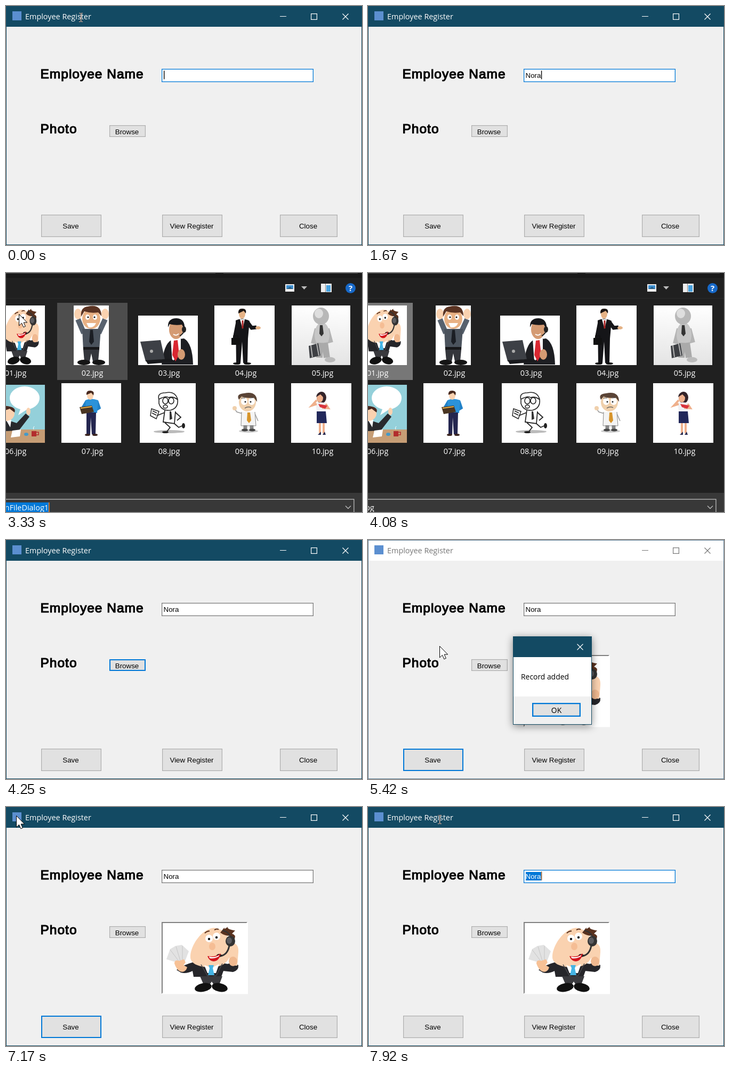
An HTML page with a canvas for the animation above (8000 ms loop, 668 px wide and 449 px high).

```html
<!DOCTYPE html>
<html lang="en">
<head>
<meta charset="utf-8">
<title>Employee Register</title>
<style>
html, body { margin: 0; width: 668px; height: 449px; overflow: hidden; }
canvas { display: block; }
</style>
</head>
<body>
<canvas id="stage" width="668" height="449"></canvas>
<script>
const g = document.getElementById('stage').getContext('2d');
const FORM = '13.33px "Liberation Sans", sans-serif';
const LABEL = '24.5px "Liberation Sans", sans-serif';
const UI = '14.4px "Open Sans", sans-serif';
const TEAL = '#134a63', BLUE = '#0078d7', SKIN = '#fad2b0', DARK = '#26262a';
const NAME = 'Nora';
const LOOP = 8000, TICKS_PER_SECOND = 12;

// --- drawing helpers ---
function rect(color, x, y, w, h) {
  g.fillStyle = color;
  g.fillRect(x, y, w, h);
}
function frame(color, x, y, w, h, lw = 1) {
  g.strokeStyle = color;
  g.lineWidth = lw;
  g.strokeRect(x + lw / 2, y + lw / 2, w - lw, h - lw);
}
function text(s, x, y, font = FORM, color = '#000', align = 'left') {
  g.font = font;
  g.fillStyle = color;
  g.textAlign = align;
  g.fillText(s, x, y);
}
function shape(color, d) {
  g.fillStyle = color;
  g.fill(new Path2D(d));
}
function line(color, lw, d) {
  g.strokeStyle = color;
  g.lineWidth = lw;
  g.stroke(new Path2D(d));
}
function oval(color, x, y, rx, ry = rx, angle = 0) {
  g.fillStyle = color;
  g.beginPath();
  g.ellipse(x, y, rx, ry, angle, 0, 7);
  g.fill();
}
function invert(x, y, w, h) {
  g.globalCompositeOperation = 'difference';
  rect('#fff', x, y, w, h);
  g.globalCompositeOperation = 'source-over';
}
function picture(x, y, w, h, draw, sx = 1, sy = 1) {
  g.save();
  g.translate(x, y);
  g.beginPath();
  g.rect(0, 0, w, h);
  g.clip();
  rect('#fff', 0, 0, w, h);
  g.scale(sx, sy);
  draw();
  g.restore();
}
function popup(progress, cx, cy, draw) {
  const s = 0.92 + 0.08 * progress;
  g.save();
  g.globalAlpha = progress;
  g.translate(cx, cy);
  g.scale(s, s);
  g.translate(-cx, -cy);
  draw();
  g.restore();
}

// --- pictures ---
function caller() {
  shape('#e2e2e2', 'M30 75L7 68L14 49L24 43L36 41L49 53L41 74Z');
  line('#c6c6c6', 1, 'M32 74L14 50M34 74L25 44M37 74L37 43');
  shape(DARK, 'M26 88Q40 78 56 74L112 74Q124 80 128 73L142 79Q143 89 132 92L114 90L110 101L58 101L56 90Q44 96 34 93Z');
  shape(SKIN, 'M122 38Q143 34 142 54L140 80L128 80Q124 66 122 38Z');
  oval('#f0b990', 132, 72, 8, 9);
  shape(SKIN, 'M52 62C53 42 72 12 96 9C118 10 131 34 127 58C123 78 106 84 86 83C66 82 51 76 52 62Z');
  shape('#f7c196', 'M22 76Q22 68 31 71L40 68L43 74L39 79L46 83Q43 94 33 91Q26 88 22 76Z');
  shape('#59321f', 'M108 18L116 8Q114 14 122 7Q120 12 136 14L130 20Q138 22 135 30L126 24Q116 24 108 18Z');
  line('#333', 2, 'M112 14Q126 16 129 32');
  oval('#333', 127, 34, 9, 10);
  oval('#5c5c60', 125, 33, 5, 6);
  line('#333', 3, 'M125 42Q122 60 108 62');
  oval('#222', 106, 61, 5, 3);
  oval('#fff', 87, 29, 7, 7);
  oval('#fff', 101, 25, 7, 7);
  oval('#111', 87, 30, 2.2);
  oval('#111', 101, 27, 2.2);
  line('#59321f', 2, 'M79 19Q83 15 88 15M97 13Q101 10 105 12');
  oval('#f5bd94', 93, 44, 6, 7);
  shape('#d3161d', 'M84 62Q98 65 109 57Q106 72 95 72Q87 71 84 62Z');
  shape('#fff', 'M87 63Q98 66 106 60L105 63Q95 68 88 66Z');
  shape('#fff', 'M78 79L92 84L106 77L100 94H84Z');
  shape('#45b4e4', 'M86 79H96L94 85L97 98H85L88 85Z');
  line('#48484c', 1.5, 'M72 78L84 99L92 102L101 98L112 76');
  shape('#3a3a3e', 'M70 100H112L106 116H96L92 110L88 116H77Z');
  oval('#111', 76, 121, 16, 8, -0.2);
  oval('#111', 107, 121, 15, 8, 0.2);
}
function cheering() {
  line('#58626e', 10, 'M19 52L8 26M47 52L59 26');
  oval(SKIN, 8, 16, 7, 10);
  oval(SKIN, 59, 16, 7, 10);
  shape('#4b535d', 'M16 44H51L48 84H18Z');
  oval('#e8b184', 33, 25, 17, 19);
  shape('#5b3423', 'M14 21Q12 4 26 2Q52 -4 52 20L46 13Q32 15 20 11Z');
  oval('#fff', 26, 22, 4, 5);
  oval('#fff', 40, 22, 4, 5);
  oval('#111', 27, 22, 1.6);
  oval('#111', 39, 22, 1.6);
  shape('#fff', 'M24 33H42Q38 43 28 41Z');
  shape('#1b1e24', 'M31 46H36L38 68L33 74L29 68Z');
  rect('#18181a', 18, 78, 30, 5);
  shape('#34363c', 'M18 83H48L46 105H36L33 90L30 105H20Z');
  oval('#151515', 19, 107, 12, 5);
  oval('#151515', 47, 107, 12, 5);
}
function operator() {
  shape('#1d1e22', 'M44 92Q48 54 62 46L86 43Q102 52 103 92Z');
  shape('#fff', 'M61 44H80L80 72L64 86Z');
  shape('#d92731', 'M67 47L74 46L77 74L70 86L64 74Z');
  oval('#d49b73', 71, 26, 13, 18);
  shape('#17181b', 'M56 22Q55 5 72 5Q89 6 87 27L82 17Q70 19 59 16Z');
  line('#222', 2, 'M86 20Q89 32 78 38');
  oval('#222', 86, 26, 4, 6);
  line('#fff', 2, 'M66 35Q72 39 76 34');
  shape('#3d4046', 'M4 49L42 46L50 82L14 86Z');
  shape('#191a1d', 'M14 84L62 81L70 87L18 91Z');
  oval('#d49b73', 81, 73, 7, 10);
  oval('#aaa', 25, 67, 3);
}
function pointing() {
  line('#151518', 7, 'M44 31L38 62M62 31L70 42L79 41');
  shape('#151518', 'M40 28Q52 22 66 29L63 62L62 108H54L52 68L49 108H41Z');
  shape('#fff', 'M48 26H57L53 44Z');
  line('#a22', 3, 'M53 28V43');
  oval('#e5b285', 52, 16, 6, 9);
  shape('#1b1512', 'M45 15Q44 5 53 6Q61 6 59 15L55 10Z');
  oval('#e5b285', 82, 42, 5, 3);
  rect('#111', 32, 61, 16, 13);
  line('#111', 1.5, 'M36 61V57H44V61');
  oval('#111', 42, 109, 7, 2);
  oval('#111', 62, 109, 7, 2);
}
function mannequin() {
  const shade = g.createLinearGradient(0, 0, 0, 112);
  shade.addColorStop(0, '#fff');
  shade.addColorStop(1, '#e4e4e4');
  rect(shade, 0, 0, 110, 112);
  line('#b4b4b4', 10, 'M48 44L41 72M66 44L73 70');
  oval('#c6c6c6', 57, 55, 14, 23);
  oval('#b8b8b8', 55, 20, 15, 16);
  oval('#dedede', 51, 15, 8, 9);
  line('#aaa', 12, 'M53 70L52 98M62 70L66 98');
  oval('#bbb', 72, 102, 10, 5);
  shape('#333', 'M53 37H58L60 53L56 58L52 53Z');
  shape('#3e4044', 'M32 76L50 71L54 94L34 99Z');
  line('#b5b5b5', 2, 'M36 75L39 97M47 72L51 94');
}
function presenter() {
  rect('#94d0da', 0, 0, 113, 110);
  oval('#fff', 75, 25, 28, 22);
  shape('#fff', 'M68 43L63 57L80 46Z');
  rect('#c69d75', 0, 84, 113, 26);
  shape('#28292d', 'M18 88Q20 66 42 66L60 72L77 54L84 60L64 86Z');
  shape('#fff', 'M40 66H50L48 80Z');
  oval(SKIN, 40, 54, 16, 14);
  shape('#47281f', 'M22 53Q22 37 42 40Q60 42 56 52L47 45L36 49Z');
  oval(SKIN, 82, 50, 4, 7);
  shape('#fff', 'M52 86L68 84L66 97L49 99Z');
  oval('#4499c8', 78, 93, 4, 3);
  rect('#b32d2d', 88, 87, 9, 10);
  line('#b32d2d', 1.5, 'M97 89H101V94H97');
  line('#fff', 1, 'M92 84Q90 81 93 78');
}
function clapper() {
  line('#2181c8', 7, 'M48 34L41 46M66 34L70 46L60 52');
  shape('#2b92d9', 'M45 32Q55 27 69 32L67 56H46Z');
  oval(SKIN, 54, 23, 6, 8);
  shape('#48291e', 'M47 22Q46 13 55 14Q63 15 60 23L56 18Z');
  shape('#24264f', 'M47 55H65L64 96H57L55 64L54 96H47Z');
  shape('#493522', 'M34 45L57 42L61 54L38 58Z');
  line('#e8b04a', 2, 'M36 47L57 44');
  oval('#3a2420', 49, 97, 5, 2);
  oval('#3a2420', 63, 97, 5, 2);
}
function runner() {
  oval('#bbb', 55, 91, 29, 3);
  oval('#fff', 51, 33, 15, 17);
  line('#222', 1.6, 'M36 31Q32 18 48 18Q66 14 71 30Q73 47 57 51Q40 52 36 38ZM36 30Q50 23 54 27Q63 24 71 31M43 33A5 6 0 1 0 53 33A5 6 0 1 0 43 33M54 33A5 6 0 1 0 64 33A5 6 0 1 0 54 33M44 44A4 3 0 1 0 52 44A4 3 0 1 0 44 44');
  line('#222', 1.8, 'M47 51L44 73L65 76L67 53M47 55L32 61M67 55L77 64L70 70M47 74L57 83L50 92M65 76L73 83L82 79');
  shape('#333', 'M56 53L59 53L61 67L56 69Z');
  line('#222', 1.5, 'M22 48L36 53L31 67L20 61ZM24 52L32 56M23 56L31 60');
  oval('#222', 48, 92, 6, 2);
  oval('#222', 82, 80, 3, 5);
}
function doctor() {
  oval('#ccc', 64, 90, 18, 3);
  line('#999', 1.5, 'M52 57L42 54L38 48M76 57L82 71');
  shape('#f4f4f4', 'M51 54H77L78 80H51Z');
  line('#888', 1, 'M51 54L50 80H78L76 54');
  line('#888', 7, 'M58 79V87M70 79V87');
  oval('#f0d0ac', 62, 36, 16, 17);
  oval('#f0d0ac', 38, 47, 4);
  shape('#5a4436', 'M46 31Q40 20 56 19Q80 14 80 35L74 27Q60 29 51 25Z');
  oval('#fff', 56, 34, 6, 7);
  oval('#fff', 70, 34, 6, 7);
  oval('#222', 58, 35, 1.5);
  oval('#222', 68, 35, 1.5);
  line('#555', 1.2, 'M50 28L58 28M67 28L75 27M57 47Q63 43 69 46');
  shape('#d7952c', 'M62 55H67L69 70L65 75L61 70Z');
  oval('#444', 57, 88, 6, 2.5);
  oval('#444', 71, 88, 6, 2.5);
}
function shopper() {
  oval('#34242a', 57, 27, 9, 11);
  oval('#efb08c', 54, 28, 6, 8);
  shape('#34242a', 'M47 26Q48 16 59 17Q65 20 62 28L55 21Z');
  shape('#f1f1f4', 'M46 38Q57 34 66 38L65 54H48Z');
  line('#efb08c', 4, 'M48 39L39 42L48 32M65 39L70 47L58 46');
  shape('#d9343c', 'M51 39L68 42L64 48L54 45Z');
  shape('#22285a', 'M48 53H65L67 75H48Z');
  line('#efb08c', 4, 'M54 75V94M61 75V94');
  shape('#2a2b50', 'M50 97L56 91V97ZM59 97L63 91L65 97Z');
}

// --- windows ---
function cross(x, y, color) {
  line(color, 1.2, `M${x} ${y}l11 11m0 -11l-11 11`);
}
function label(s, x, y) {
  g.letterSpacing = '1px';
  text(s, x, y, LABEL);
  g.strokeStyle = '#000';
  g.lineWidth = 1.2;
  g.strokeText(s, x, y);
  g.letterSpacing = '0px';
}
function button(caption, x, y, w, h, baseline, state) {
  rect(state === 'hot' ? '#e5f1fb' : '#e1e1e1', x, y, w, h);
  frame(state ? BLUE : '#adadad', x, y, w, h, state === 'focus' ? 2 : 1.2);
  text(caption, x + w / 2 - 1, baseline, FORM, '#000', 'center');
}
function field(t, focus, hover) {
  rect('#fff', 292, 118, 285, 25);
  frame(focus ? BLUE : hover ? '#171717' : '#7a7a7a', 292, 118, 285, 25, 1.3);
  const typed = t >= 20 ? 4 : [6, 9, 11].filter(k => t >= k).length;
  const value = NAME.slice(0, typed), selected = t >= 94;
  g.font = FORM;
  const width = g.measureText(value).width;
  if (selected) rect(BLUE, 296, 122, width + 1, 16);
  text(value, 295.5, 135, FORM, selected ? '#fff' : '#000');
  if (t < 2 || (t >= 6 && t < 17) || (t >= 20 && t < 31) || t >= 92)
    invert(296 + width, 121.5, 1.4, 16);
}
function mainWindow(t, hover) {
  const active = !((t >= 33 && t < 51) || (t >= 63 && t < 75));
  const ink = active ? '#fff' : '#777';
  const focus = t < 51 ? 'text' : t < 63 ? 'browse' : t < 92 ? 'save' : 'text';
  rect('#f0f0f0', 0, 0, 668, 449);
  rect(active ? TEAL : '#fff', 0, 0, 668, 39);
  frame(active ? TEAL : '#5f7f96', 0, 0, 668, 449);
  rect('#5b8fd0', 12, 10, 17, 17);
  text('Employee Register', 36, 25, UI, ink);
  rect(ink, 514, 19, 12, 1);
  frame(ink, 572, 14, 12, 12, 1.2);
  cross(631.5, 14.5, ink);
  label('Employee Name', 64.5, 136);
  label('Photo', 64.5, 239);
  field(t, focus === 'text', hover);
  button('Browse', 194, 224, 68, 22, 241, focus === 'browse' ? 'focus' : t >= 27 && t < 51 ? 'hot' : '');
  button('Save', 66, 392, 113, 42, 418, focus === 'save' ? 'focus' : t >= 60 && t < 63 ? 'hot' : '');
  button('View Register', 293, 392, 113, 42, 418);
  button('Close', 514, 392, 108, 42, 418);
  if (t >= 52) {
    rect('#fff', 292, 216, 162, 135.5);
    shape('#808080', 'M292 216H453L451 218H294V349L292 351Z');
    picture(294, 218, 158, 131, caller);
  }
}
function fileDialog(t) {
  rect('#202020', 0, 0, 668, 449);
  rect('#191919', 0, 0, 668, 9);
  rect('#454545', 0, 0, 393, 1);
  rect('#454545', 408, 0, 252, 1);
  rect('#2b2b2b', 0, 47, 668, 1);
  rect('#eee', 524, 21, 17, 14);
  rect('#3e8fd0', 526, 23, 13, 7);
  shape('#225c86', 'M526 30L533 26L539 30Z');
  shape('#bbb', 'M554 25H565L559.5 31Z');
  rect('#eee', 591, 20, 20, 16);
  rect('#4aa3e0', 601, 23, 8, 12);
  rect('#888', 599, 20, 1, 16);
  oval('#1769c9', 646.5, 28.5, 9.5);
  text('?', 646.5, 34, 'bold 15px "Open Sans", sans-serif', '#fff', 'center');

  if (t < 44) rect('#4d4d4d', 96, 56, 132, 145);
  else rect(t < 49 ? '#4d4d4d' : '#777', -48, 56, 132, 145);
  picture(-40, 61, 113, 112, caller, 113 / 158, 112 / 131);
  picture(127, 61, 66, 112, cheering);
  picture(248, 80, 112, 93, operator);
  picture(391, 61, 113, 112, pointing);
  picture(536, 61, 110, 112, mannequin);
  picture(-40, 210, 113, 109, presenter);
  picture(104, 207, 112, 112, clapper);
  picture(251, 207, 105, 112, runner);
  picture(391, 207, 112, 112, doctor);
  picture(535, 207, 113, 112, shopper);
  for (let i = 0; i < 10; i++)
    text(String(i + 1).padStart(2, '0') + '.jpg', 18 + i % 5 * 144, i < 5 ? 193 : 340, UI, '#fff', 'center');

  rect('#383838', 0, 413, 668, 36);
  frame('#c8c8c8', -9, 424.5, 662.5, 40, 1.2);
  line('#bbb', 1.4, 'M637 437.5L642 442.5L647 437.5');
  if (t < 49) {
    rect(BLUE, -40, 431, 120, 18);
    text('openFileDialog1', 80, 446, UI, '#fff', 'right');
    if (t < 47) rect('#ff8728', 80, 431, 1.4, 18);
  } else text('01.jpg', -29, 446, UI, '#fff');
}
function messageBox(t) {
  g.shadowColor = 'rgba(0,0,0,.45)';
  g.shadowBlur = 14;
  g.shadowOffsetY = 3;
  rect('#fff', 272, 181, 148, 166);
  g.shadowColor = 'transparent';
  rect(TEAL, 272, 181, 148, 39);
  rect('#f0f0f0', 272, 294, 148, 53);
  frame(TEAL, 272, 181, 148, 166);
  cross(392.5, 195.5, '#fff');
  text('Record added', 287, 262, '13.9px "Open Sans", sans-serif');
  const hot = t >= 71;
  rect(hot ? '#e5f1fb' : '#e1e1e1', 308, 306, 91, 26);
  frame(BLUE, 308, 306, 91, 26, hot ? 1.3 : 2.3);
  text('OK', 353.5, 325, '13.9px "Open Sans", sans-serif', '#000', 'center');
}

// --- pointer: [tick, x, y], linear in between ---
const PATH = [
  [0, 140, 21], [5, 140, 21], [6, -99, 0], [23, -99, 0], [24, 122, 46], [28, 65, 111],
  [38, 65, 111], [39, 24, 77], [43, 24, 77], [44, -99, 77], [64, -99, 77], [65, 134, 199],
  [66, 158, 191], [67, 158, 191], [68, 158, 190], [69, 158, 190], [73, 159, 184], [77, 159, 184],
  [81, 165, 60], [82, 160, 24], [83, 140, 20], [86, 19, 16], [87, 26, 17], [91, 134, 23], [96, 134, 23]
];
function pointerAt(t) {
  const i = PATH.findIndex(k => k[0] > t);
  const [t0, x0, y0] = PATH[i - 1], [t1, x1, y1] = PATH[i];
  const f = (t - t0) / (t1 - t0);
  return [x0 + (x1 - x0) * f, y0 + (y1 - y0) * f];
}
function pointer(t, x, y, overField) {
  if (t >= 33 && t <= 38) {
    line('#1f93e6', 5, `M${x - 10} ${y}a10 10 0 1 0 20 0a10 10 0 1 0 -20 0`);
    line('#59b5f2', 2, `M${x - 9} ${y - 4}a10 10 0 0 1 9 -6`);
  } else if (overField) {
    x = Math.round(x);
    y = Math.round(y);
    invert(x, y - 7, 1.3, 15);
    for (const dy of [-8, 8]) {
      invert(x - 3, y + dy, 3, 1);
      invert(x + 1, y + dy, 3, 1);
    }
  } else {
    const d = `M${x + 0.5} ${y + 0.5}v21.5l5 -4.8 3.3 7.6 3.6 -1.6 -3.3 -7.2h6.6z`;
    shape('#fff', d);
    line('#000', 1, d);
  }
}

function draw(now) {
  // A small lead absorbs times rounded to 10 ms.
  const t = Math.floor(now % LOOP * TICKS_PER_SECOND / 1000 + 0.06) % 96;
  const [x, y] = pointerAt(t);
  const overField = x > 128 && y < 32;
  mainWindow(t, overField);
  if (t >= 38 && t < 51) popup([0.5, 0.88][t - 38] || 1, 334, 225, () => fileDialog(t));
  if (t >= 63 && t < 75) popup([0.4, 0.85][t - 63] || 1, 346, 264, () => messageBox(t));
  pointer(t, x, y, overField);
}
const start = performance.now();
function loop() {
  draw(performance.now() - start);
  requestAnimationFrame(loop);
}
loop();
</script>
</body>
</html>
```
